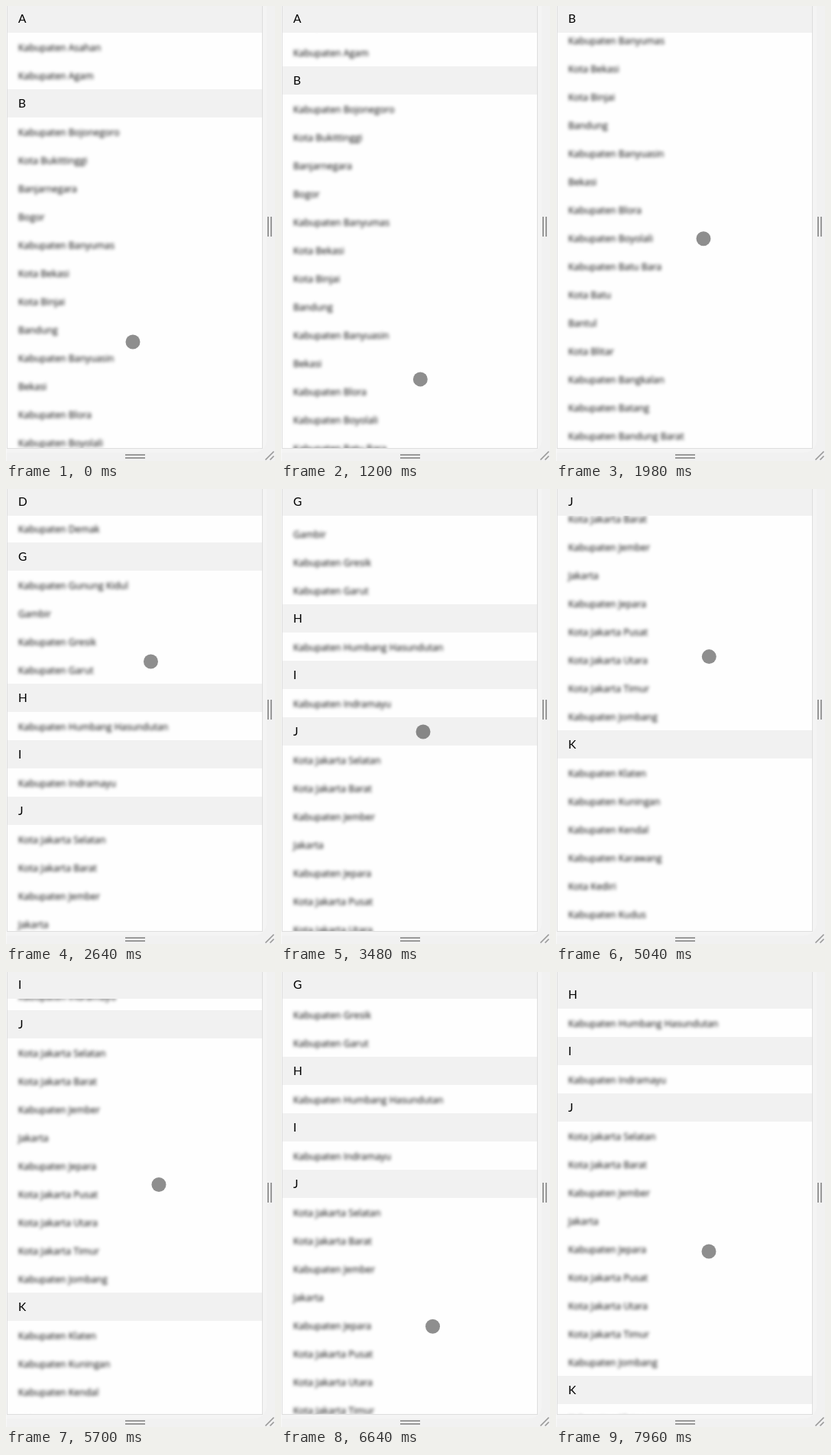
An HTML page that plays this animation: 352 by 596 pixels, repeating every 8 s.

```html
<!DOCTYPE html>
<html lang="id">
<head>
<meta charset="utf-8">
<title>Daftar kota</title>
<style>
  html, body { margin: 0; width: 100%; height: 100%; overflow: hidden; background: #f1f1f1; }
  body { position: relative; font-family: "Open Sans", "Noto Sans", sans-serif; color: #000; }
  .edge { position: absolute; left: 0; top: 0; width: 1px; height: 596px; background: #f8f8f8; }
  .glow { position: absolute; left: 1px; top: -20px; width: 340px; height: 605px;
    border-radius: 0 0 16px 0; background: #f4f4f4; }
  .panel { position: absolute; left: 1px; top: -4px; width: 333px; height: 583px;
    background: #fefefe; border: 1px solid #dedede; border-top: 0; overflow: hidden; }
  #list { position: absolute; left: 0; top: 2px; width: 333px; height: 581px;
    overflow: hidden; isolation: isolate; }
  h2, p { margin: 0; padding-left: 14px; height: 37px; line-height: 37px; white-space: nowrap; }
  h2 { position: sticky; top: 0; z-index: 1; background: #f1f1f1;
    font: 400 15.5px/37px Lato, "Open Sans", sans-serif; }
  p { font-size: 12.3px; filter: blur(2px); transform: translateY(.5px); }
  #touch { position: absolute; left: -10px; top: -9px; width: 19px; height: 19px;
    border-radius: 50%; background: rgba(0, 0, 0, .44); }
  svg { position: absolute; left: 0; top: 0; }
</style>
</head>
<body>
<div class="edge"></div>
<div class="glow"></div>
<div class="panel"><div id="list"></div></div>
<svg width="352" height="596" fill="none" stroke="#999" stroke-width="2">
  <path d="M343 276v26M347 276v26M156 588h26M156 592h26"/>
  <path d="M339.5 594.5l11-11M345.5 594.5l5-5" stroke-width="1.6"/>
</svg>
<div id="touch"></div>
<script>
const LOOP = 8000;

// "+" stands for Kabupaten, "-" for Kota
const groups = {
  A: "+Asahan,+Agam",
  B: "+Bojonegoro,-Bukittinggi,Banjarnegara,Bogor,+Banyumas,-Bekasi,-Binjai,Bandung,+Banyuasin,Bekasi," +
     "+Blora,+Boyolali,+Batu Bara,-Batu,Bantul,-Blitar,+Bangkalan,+Batang,+Bandung Barat,+Brebes,-Bandung,+Bogor",
  C: "+Cianjur,+Cilacap,-Cirebon,-Cimahi",
  D: "-Depok,+Deli Serdang,+Demak",
  G: "+Gunung Kidul,Gambir,+Gresik,+Garut",
  H: "+Humbang Hasundutan",
  I: "+Indramayu",
  J: "-Jakarta Selatan,-Jakarta Barat,+Jember,Jakarta,+Jepara,-Jakarta Pusat,-Jakarta Utara,-Jakarta Timur,+Jombang",
  K: "+Klaten,+Kuningan,+Kendal,+Karawang,-Kediri,+Kudus,+Kebumen,+Karanganyar,-Kupang,+Kampar,+Kediri,+Karo"
};

const list = document.getElementById("list");
const touch = document.getElementById("touch");

function add(parent, tag, text = "") {
  const el = parent.appendChild(document.createElement(tag));
  el.textContent = text;
  return el;
}

for (const [letter, names] of Object.entries(groups)) {
  const section = add(list, "section");
  add(section, "h2", letter);
  for (const name of names.split(",")) {
    add(section, "p", name.replace("+", "Kabupaten ").replace("-", "Kota "));
  }
}

const smooth = u => u * u * (3 - 2 * u);
const speedUp = u => u * u;
const slowDown = u => 1 - (1 - u) ** 2;
const fling = u => 1 - (1 - u) ** 4;

// Each stop: end time, place reached, easing on the way there
const finger = [
  [0, [166.5, 439.5]],
  [150, [166.5, 439.5]],
  [390, [159.5, 480.5], smooth],
  [810, [181.5, 511.5], smooth],
  [1980, [193.5, 304.5], speedUp],
  [2600, [190, 225], slowDown],
  [3480, [186.5, 317.5], smooth],
  [3800, [186, 260], smooth],
  [4290, [170.5, 429.5], smooth],
  [5250, [205, 190], smooth],
  [5700, [200.5, 277.5], speedUp],
  [6400, [199, 465], slowDown],
  [6550, [199, 465]],
  [7960, [200.5, 365.5], smooth]
];

const scroll = [
  [0, [0]],
  [810, [0]],
  [1980, [265], speedUp],
  [3480, [1327], fling],
  [4290, [1394], smooth],
  [5250, [1720], smooth],
  [5700, [1577], speedUp],
  [6400, [1366], slowDown],
  [6550, [1366]],
  [7960, [1467], smooth]
];

function at(stops, t) {
  const next = stops.findIndex(stop => stop[0] > t);
  if (next < 0) return stops[stops.length - 1][1];
  const [t0, from] = stops[next - 1];
  const [t1, to, ease = smooth] = stops[next];
  const u = ease((t - t0) / (t1 - t0));
  return from.map((a, i) => a + (to[i] - a) * u);
}

function draw(now) {
  const t = now % LOOP;
  const [x, y] = at(finger, t);
  list.scrollTop = Math.round(at(scroll, t)[0]);
  touch.style.transform = `translate(${x}px, ${y}px)`;
}

const start = performance.now();
function tick() {
  draw(performance.now() - start);
  requestAnimationFrame(tick);
}
tick();
</script>
</body>
</html>
```
